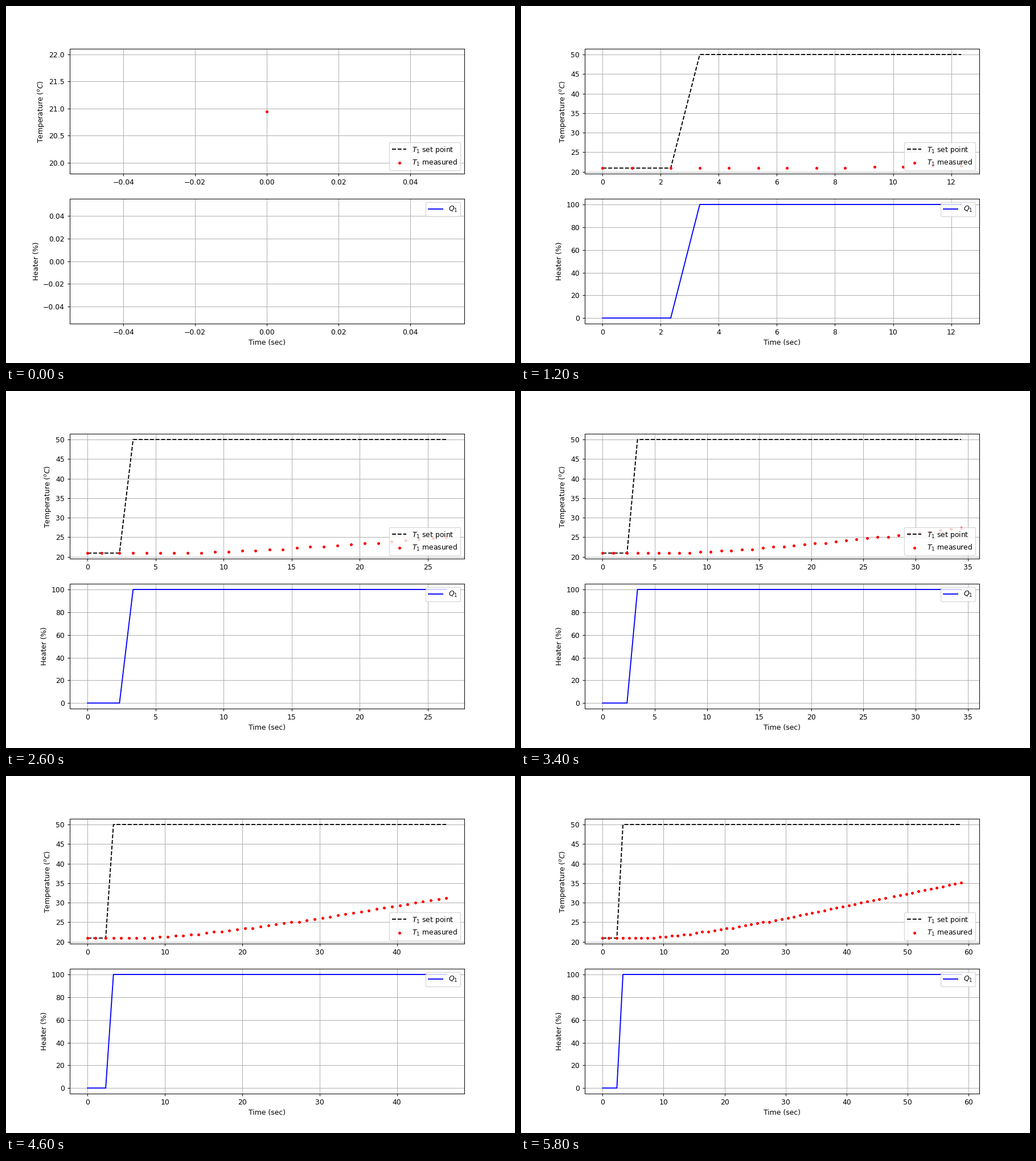
Animation of 894 by 626 pixels, one loop 5.9 s. Source, as a matplotlib script:

```python
import matplotlib.pyplot as plt
import numpy as np
from matplotlib.animation import FuncAnimation

FRAMES, INTERVAL = 59, 100
DEG_PER_COUNT = 0.3223        # sensor resolution
STALLS = [10, 12, 14, 17, 21, 27]  # samples that repeat the previous reading

n = np.arange(FRAMES)

# Sample clock: roughly 1 s steps with a few late samples
jitter = np.where(n < 30, 0.343 + 0.02 * (n % 2), 0.362)
time = n + np.select([n == 0, n == 1, n < 5, n < 47],
                     [0, 0.016, 0.346, jitter], 0.79)

# Quantised temperature ramp after a dead time
counts = np.maximum(n - 8, 0) - np.searchsorted(STALLS, n, side="right")
temp = 20.95 + DEG_PER_COUNT * counts

set_point = np.where(n < 3, temp[0], 50.0)
heater = np.where(n < 3, 0.0, 100.0)

plt.rcParams["font.family"] = "DejaVu Sans"
# 894 x 626 px
fig, (top, bottom) = plt.subplots(2, 1, figsize=(10, 7.0023), dpi=89.4)

curves = [
    (top.plot([], [], "k--", label=r"$T_1$ set point")[0], set_point),
    (top.plot([], [], "r.", label=r"$T_1$ measured")[0], temp),
    (bottom.plot([], [], "b-", label=r"$Q_1$")[0], heater),
]

top.set_ylabel(r"Temperature ($^oC$)")
bottom.set_ylabel("Heater (%)")
bottom.set_xlabel("Time (sec)")
for ax, loc in ((top, "lower right"), (bottom, "upper right")):
    ax.grid()
    ax.legend(loc=loc)


def update(i):
    for line, values in curves:
        line.set_data(time[:i + 1], values[:i + 1])
    for ax in (top, bottom):
        ax.relim()
        ax.autoscale_view()
    return [line for line, _ in curves]


anim = FuncAnimation(fig, update, frames=FRAMES, interval=INTERVAL,
                     init_func=lambda: update(0), repeat=True, repeat_delay=0)
plt.show()
```
